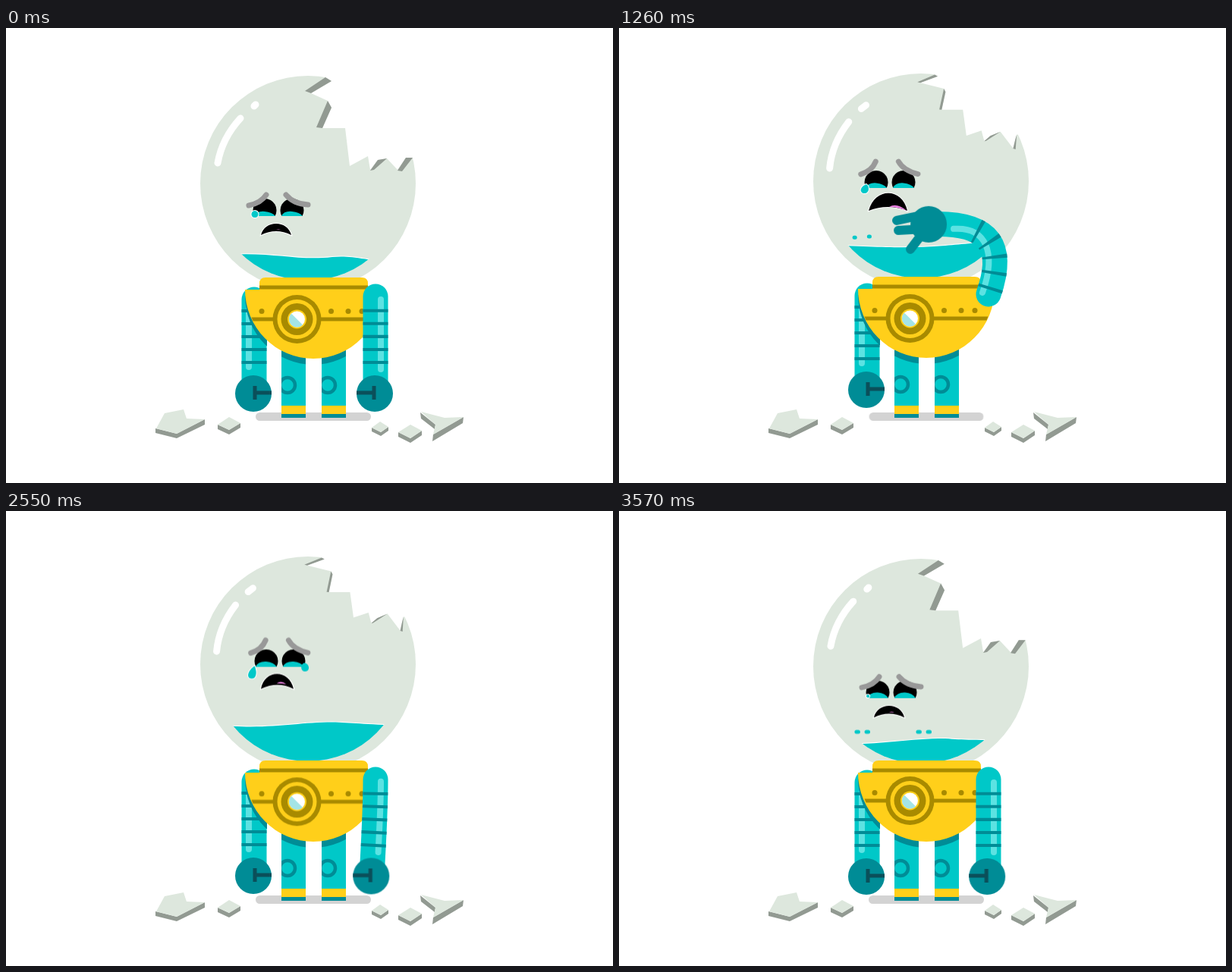
An HTML page without scripts that plays this animation: 800x600 px, repeating every 3600 ms.

```html
<!DOCTYPE html>
<html lang="en">
<head>
<meta charset="utf-8">
<title>Sad robot</title>
<style>
html, body { margin: 0; width: 100%; height: 100%; overflow: hidden; background: #fff; }
svg { display: block; width: 800px; height: 600px; }

.glass { fill: #dde7dd; }
.edge { fill: #929a92; }
.teal { fill: #00c8c8; }
.dark { fill: #008c96; }
.yellow { fill: #ffcf1a; }
.gold { fill: #a88a00; }
.line { fill: none; stroke-linecap: round; stroke-linejoin: round; }
.halo { stroke: #fff; stroke-width: 2; paint-order: stroke; }
.limb { stroke: #00c8c8; stroke-width: 33; }
.shine { stroke: #5ce2e2; stroke-width: 8; }
.bands { fill: none; stroke: #008c96; stroke-width: 33; stroke-dasharray: 0 17 4 13 4 13 4 13 4 13 4 300; }
.hook { fill: none; stroke: #0b4f5a; stroke-width: 5; }

/* Head tilt: one swing up and back */
.tilt { animation: 3.6s cubic-bezier(.3,.35,.75,.95) infinite; }
.hole { d: path("M421 40L421 65L429 70L402 86L424 96L429 105L417 132L447 132L453 182L477 169L480 187L490 174L502 172L516 187L527 171L536 171L560 171L560 40Z"); animation-name: hole; }
.rim { d: path("M421 65L429 70L402 86L394 83ZM424 96L429 105L417 132L409 131ZM480 188L490 174L502 172L485 187ZM516 188L527 171L536 171L522 189Z"); animation-name: rim; }
.glare { d: path("M309 119Q285 145 279 178M327 103L329 101"); animation-name: glare; }
.brows { d: path("M-39 -14Q-23 -17 -16 -28M10 -28Q20 -16 39 -15"); animation-name: brows; }
.pool { d: path("M-32 0Q-29 -7 -18 -6Q-8 -5 -4 0Z"); animation-name: pool; }
@keyframes hole { 59.2% { animation-timing-function: linear; d: path("M414 40L414 60L416 61L395 66L430 73L431 75L429 97L456 97L460 124L478 120L482 132L489 128L503 121L521 146L520 137L519 127L560 127L560 40Z"); } }
@keyframes rim { 59.2% { animation-timing-function: linear; d: path("M414 60L416 61L395 66L393 66ZM430 73L431 75L429 97L428 97ZM482 132L489 128L503 121L483 132ZM521 146L520 137L519 127L523 147Z"); } }
@keyframes glare { 59.2% { animation-timing-function: linear; d: path("M300 126Q279 155 277 188M316 108L324 102"); } }
@keyframes brows { 59.2% { animation-timing-function: linear; d: path("M-38 -20Q-24 -25 -20 -38M12 -38Q17 -26 36 -20"); } }
@keyframes pool { 59.2% { animation-timing-function: linear; d: path("M-33 0Q-28 -9 -18 -9Q-8 -8 -4 0Z"); } }

.face, .dome, .mouth, .tongue, .liquid, .body, .lens, .left-arm, .level, .ground, .arm, .arm-shine, .bands.live, .hand, .fingers { animation: 3.6s linear infinite; }
.face { transform: translate(359px, 248px); animation-name: face; }
@keyframes face {
  20% { transform: translate(357px, 226px); }
  35% { transform: translate(357px, 211px); }
  50.8% { transform: translate(360px, 194px); }
  59.2% { transform: translate(362px, 189px); }
  82.5% { transform: translate(360px, 222px); }
}
.dome { cy: 205px; animation-name: dome; }
@keyframes dome { 20% { cy: 200px; } 35% { cy: 202px; } 50.8%, 59.2% { cy: 201px; } 82.5% { cy: 203px; } }

.mouth { d: path("M-23 25C-18 5 12 5 17 25Q-3 15 -23 25Z"); animation-name: mouth; }
@keyframes mouth {
  20% { d: path("M-23 26C-18 3 12 3 18 26Q-3 15 -23 26Z"); }
  35% { d: path("M-28 30C-20 -1 16 -1 23 30Q-3 20 -28 30Z"); }
  50.8% { d: path("M-23 28C-18 3 12 3 18 28Q-3 15 -23 28Z"); }
  59.2% { d: path("M-24 24C-19 3 11 3 17 24Q-3 14 -24 24Z"); }
  82.5% { d: path("M-26 34C-22 2 14 2 19 34Q-3 23 -26 34Z"); }
}
.tongue { d: path("M-3 18Q0 17 3 18Q0 18 -3 18Z"); animation-name: tongue; }
@keyframes tongue {
  20%, 50.8%, 65% { d: path("M-3 18Q0 17 3 18Q0 18 -3 18Z"); }
  35% { d: path("M-1 25Q9 19 22 30Q11 25 -1 25Z"); }
  82.5% { d: path("M-7 29Q6 17 19 33Q8 28 -7 29Z"); }
}
.liquid { d: path("M270 301C345 292 380 308 430 302C455 300 470 304 530 315V345H270Z"); animation-name: liquid; }
@keyframes liquid {
  20% { d: path("M270 291C345 289 380 294 430 289C455 287 470 290 530 306V345H270Z"); }
  35% { d: path("M270 286C345 289 380 291 430 287C455 285 470 283 530 279V345H270Z"); }
  50.8% { d: path("M270 268C345 282 380 272 430 278C455 284 470 281 530 276V345H270Z"); }
  59.2% { d: path("M270 272C345 285 380 272 430 271C455 270 470 274 530 275V345H270Z"); }
  82.5% { d: path("M270 291C345 294 380 285 430 286C455 288 470 289 530 291V345H270Z"); }
  99.2% { d: path("M270 308C345 309 380 300 430 300C455 302 470 302 530 302V345H270Z"); }
}

/* Tears run on a short cycle */
.tear-l { d: path("M-31 -7C-25 -7 -25 2 -31 2C-37 2 -37 -7 -31 -7Z"); animation: drip-l .6s linear infinite; }
@keyframes drip-l {
  20% { d: path("M-31 -3C-28 3 -29 12 -36 12C-44 12 -43 3 -31 -3Z"); }
  35% { d: path("M-38 2C-35 8 -32 22 -39 22C-47 22 -42 8 -38 2Z"); }
  55% { d: path("M-44 30C-41 45 -32 71 -44 71C-56 71 -47 45 -44 30Z"); }
  70% { d: path("M-44 74C-43 76 -40 84 -44 84C-48 84 -45 76 -44 74Z"); }
  70.1%, 91% { d: path("M-31 -3C-31 -3 -31 -3 -31 -3C-31 -3 -31 -3 -31 -3Z"); }
}
.tear-r { d: path("M31 -2C31 -2 31 -2 31 -2C31 -2 31 -2 31 -2Z"); animation: drip-r .6s linear infinite; }
@keyframes drip-r {
  20% { d: path("M32 -6C39 -6 39 4 33 4C26 4 26 -5 32 -6Z"); }
  55% { d: path("M31 -1C42 3 46 18 38 18C29 18 32 6 31 -1Z"); }
  72% { d: path("M40 40C42 48 47 64 40 64C33 64 38 48 40 40Z"); }
  86% { d: path("M40 72C41 73 43 80 40 80C37 80 39 73 40 72Z"); }
  86.1% { d: path("M31 -2C31 -2 31 -2 31 -2C31 -2 31 -2 31 -2Z"); }
}
.wiped { animation: wiped 3.6s step-end infinite; }
@keyframes wiped { 0% { opacity: 1; } 26% { opacity: 0; } 54% { opacity: 1; } }
.dry { animation: dry 3.6s step-end infinite; }
@keyframes dry { 0% { opacity: 1; } 26% { opacity: 0; } 70% { opacity: 1; } }
.late { animation: late 3.6s step-end infinite; }
@keyframes late { 0% { opacity: 0; } 11% { opacity: 1; } }
.level { transform: translateY(298px); animation-name: level; }
@keyframes level {
  20% { transform: translateY(291px); }
  35% { transform: translateY(284px); }
  50.8%, 59.2% { transform: translateY(278px); }
  82.5% { transform: translateY(283px); }
}
.splash { stroke: #00c8c8; stroke-width: 5; d: path("M-9 -9h2M8 -9h2"); animation: splash .6s linear infinite, blink .6s step-end infinite; }
@keyframes splash {
  23%, 89.9% { d: path("M-11 -6h0M11 -9h0"); }
  90% { d: path("M-5 -3h3M4 -3h3"); }
}
@keyframes blink { 0% { opacity: 1; } 23% { opacity: 0; } 90% { opacity: 1; } }

.body { animation-name: body; }
@keyframes body { 20% { transform: translateY(-4px); } 35% { transform: translateY(-1px); } 45% { transform: none; } }
.lens { animation-name: lens; }
@keyframes lens { 65% { transform: none; } 82.5%, 99.2% { transform: translateY(-2px); } }
.left-arm { animation-name: left-arm; }
@keyframes left-arm { 20% { transform: translateY(-9px); } 35% { transform: translateY(-5px); } 50.8%, 59.2% { transform: translateY(-2px); } 82.5% { transform: none; } }
.ground { transform-origin: 405px 0; animation-name: ground; }
@keyframes ground { 20% { transform: scaleX(.97); } 40% { transform: none; } }

/* Right arm: wind up, wipe, fling, drop */
.arm { d: path("M487 354C487 390 487 430 487 482"); animation-name: arm; }
@keyframes arm {
  11% { d: path("M487 354C487 390 487 430 487 482"); }
  15% { d: path("M487 354C489 390 496 430 522 470"); }
  16.7% { d: path("M487 352C496 388 512 430 545 458"); }
  20% { d: path("M487 346C452 352 422 380 417 445"); }
  29% { d: path("M487 350C590 340 540 270 430 300"); }
  35% { d: path("M487 351C508 290 492 255 408 259"); }
  42% { d: path("M487 351C590 330 560 235 430 218"); }
  50.8% { d: path("M487 352C555 325 545 265 472 235"); }
  54.4% { d: path("M487 352C530 330 560 275 590 280"); }
  56.7% { d: path("M487 352C530 345 600 350 662 350"); }
  59.2% { d: path("M487 353C520 362 565 384 624 373"); }
  64% { d: path("M487 354C510 370 560 410 560 455"); }
  68% { d: path("M487 354C487 390 480 430 472 480"); }
  72% { d: path("M487 354C487 390 487 430 486 482"); }
}
.arm-shine { d: path("M494 358C494 390 494 420 494 450"); animation-name: arm-shine; }
@keyframes arm-shine {
  11% { d: path("M494 358C494 390 494 420 494 450"); }
  15% { d: path("M494 354C496 385 500 415 516 442"); }
  16.7% { d: path("M493 350C504 380 515 410 534 434"); }
  20% { d: path("M489 352C459 360 432 385 428 416"); }
  29% { d: path("M490 344C572 335 530 284 455 304"); }
  35% { d: path("M479 349C498 295 483 262 441 265"); }
  42% { d: path("M485 343C572 325 545 242 455 228"); }
  50.8% { d: path("M484 346C540 320 532 268 500 252"); }
  54.4% { d: path("M484 345C525 322 553 272 570 274"); }
  56.7% { d: path("M487 344C530 338 590 343 635 343"); }
  59.2% { d: path("M507 342C525 350 560 371 592 366"); }
  64% { d: path("M490 347C517 363 566 405 567 430"); }
  68% { d: path("M494 354C494 390 487 425 482 450"); }
  72% { d: path("M494 358C494 390 494 420 494 450"); }
}
.bands.live { animation-name: bands; }
@keyframes bands {
  15%, 70% { stroke-dasharray: 0 17 4 13 4 13 4 13 4 13 4 300; }
  20%, 61% { stroke-dasharray: 0 6 4 17 4 17 4 17 4 17 4 300; }
}
.hand { transform: translate(486px, 482px); animation-name: hand; }
@keyframes hand {
  11% { transform: translate(486px, 482px); }
  15% { transform: translate(522px, 470px); }
  16.7% { transform: translate(545px, 458px); }
  20% { transform: translate(416px, 445px); }
  29% { transform: translate(430px, 300px); }
  35% { transform: translate(408px, 259px); }
  42% { transform: translate(430px, 218px); }
  50.8% { transform: translate(472px, 234px); }
  54.4% { transform: translate(590px, 280px); }
  56.7% { transform: translate(662px, 350px); }
  59.2% { transform: translate(624px, 373px); }
  64% { transform: translate(560px, 455px); }
  68% { transform: translate(472px, 480px); }
  72%, 99% { transform: translate(485px, 482px); }
}
.fingers { stroke: #008c96; stroke-width: 12; d: path("M0 0L0 0M0 0L0 0M0 0L0 0"); animation-name: fingers; }
@keyframes fingers {
  15%, 67% { d: path("M0 0L0 0M0 0L0 0M0 0L0 0"); }
  20% { d: path("M-16 6L-6 37M0 10L7 30M15 6L19 32"); }
  35% { d: path("M0 -14L-42 -5M-5 6L-40 8M-5 8L-24 33"); }
  50.8% { d: path("M0 -18L-36 -17M-10 -14L-40 -13M-5 13L-32 13"); }
  55%, 59.2% { d: path("M0 -4L29 -22M0 0L42 -3M0 6L39 15"); }
}
.hang { animation: hang 3.6s step-end infinite; }
@keyframes hang { 0% { opacity: 1; } 15% { opacity: 0; } 69% { opacity: 1; } }
</style>
</head>
<body>
<svg viewBox="0 0 800 600">
  <defs>
    <clipPath id="bowl"><circle class="dome" cx="398" r="128"/></clipPath>
    <clipPath id="limbs"><path d="M310 345h34v135h-34zM363 400h32v98h-32zM416 400h32v98h-32z"/></clipPath>
    <path id="torso" d="M334 345V337q0-8 8-8H469q8 0 8 8V345H495A90 91 0 0 1 315 345Z"/>
    <g id="leg">
      <path class="teal" d="M363 400h32v98h-32z"/>
      <path class="yellow" d="M363 498h32v11h-32z"/>
      <path class="dark" d="M363 509h32v5h-32z"/>
    </g>
    <g id="eye">
      <path d="M-31.500 0A15.500 15.500 0 1 1 -4.500 0Z"/>
      <path class="teal pool tilt"/>
    </g>
  </defs>

  <rect class="ground" x="329" y="507" width="152" height="11" rx="5.500" fill="#d3d3d3"/>

  <g class="edge">
    <path d="M197 528L225 535L262 516V523L225 541L197 534Z"/>
    <path d="M279 523L294 530L309 521V527L294 536L279 529Z"/>
    <path d="M482 527L494 533L504 526V531L494 538L482 532Z"/>
    <path d="M517 533L533 541L548 531V537L533 547L517 539Z"/>
    <path d="M546 507L566 523L565 529L547 515ZM603 513L563 536L562 545L602 521Z"/>
  </g>
  <g class="glass">
    <path d="M198 528L209 508L234 503L238 515L262 516L225 535Z"/>
    <path d="M279 523L294 513L309 521L294 530Z"/>
    <path d="M482 527L493 519L504 526L494 533Z"/>
    <path d="M517 533L533 523L548 531L533 541Z"/>
    <path d="M547 506L578 514L603 513L563 536L566 523Z"/>
  </g>

  <use href="#leg"/>
  <use href="#leg" x="53"/>

  <g class="left-arm">
    <path class="line limb" d="M327 358V470"/>
    <path class="line shine" d="M320 364V447"/>
    <path class="bands" d="M327 354V470"/>
    <circle class="dark" cx="326" cy="482" r="24"/>
    <path class="hook" d="M328 472V490M328 481H350"/>
  </g>

  <g clip-path="url(#limbs)">
    <g class="body">
      <use href="#torso" y="8" class="dark"/>
      <g fill="none" stroke="#008c96" stroke-width="4.500">
        <circle cx="371" cy="471" r="10"/>
        <circle cx="424" cy="471" r="10"/>
      </g>
    </g>
  </g>

  <circle class="glass dome" cx="398" r="142"/>
  <path class="hole tilt" fill="#fff"/>
  <path class="edge rim tilt"/>
  <path class="line glare tilt" stroke="#fff" stroke-width="9"/>
  <g clip-path="url(#bowl)"><path class="teal halo liquid"/></g>
  <g class="late">
    <g class="level">
      <g transform="translate(320)"><path class="line splash"/></g>
      <g class="dry"><g transform="translate(401)"><path class="line splash"/></g></g>
    </g>
  </g>

  <g class="face">
    <use href="#eye"/>
    <use href="#eye" x="36"/>
    <path class="line brows tilt" stroke="#999" stroke-width="7"/>
    <path class="halo mouth"/>
    <path class="tongue" fill="#e87fe0"/>
    <path class="teal halo tear-l"/>
    <g class="wiped"><path class="teal tear-r"/></g>
  </g>

  <g class="body">
    <use href="#torso" class="yellow"/>
    <path class="gold" d="M334 339.500h143v5h-143z"/>
    <g class="lens">
      <path class="gold" d="M323.500 381.500h163l-2 5h-159z"/>
      <g class="gold">
        <circle cx="337" cy="373.500" r="3.500"/>
        <circle cx="428.500" cy="373.500" r="3.500"/>
        <circle cx="451" cy="373.500" r="3.500"/>
        <circle cx="469" cy="373.500" r="3.500"/>
      </g>
      <circle class="gold" cx="383.500" cy="384" r="32"/>
      <circle class="yellow" cx="383.500" cy="384" r="26"/>
      <circle class="gold" cx="383.500" cy="384" r="21"/>
      <circle class="yellow" cx="383.500" cy="384" r="12.500"/>
      <circle cx="383.500" cy="384" r="10.500" fill="#fff"/>
      <path d="M376 376.600A10.500 10.500 0 0 0 391 391.400Z" fill="#a4e4e6"/>
    </g>
  </g>

  <path class="line limb arm"/>
  <path class="line shine arm-shine"/>
  <path class="bands live arm" style="animation-name: bands, arm"/>
  <g class="hand">
    <path class="line fingers"/>
    <circle class="dark" r="24"/>
    <path class="hook hang" d="M-1 -10V8M-1 -1H-24"/>
  </g>
</svg>
</body>
</html>
```
